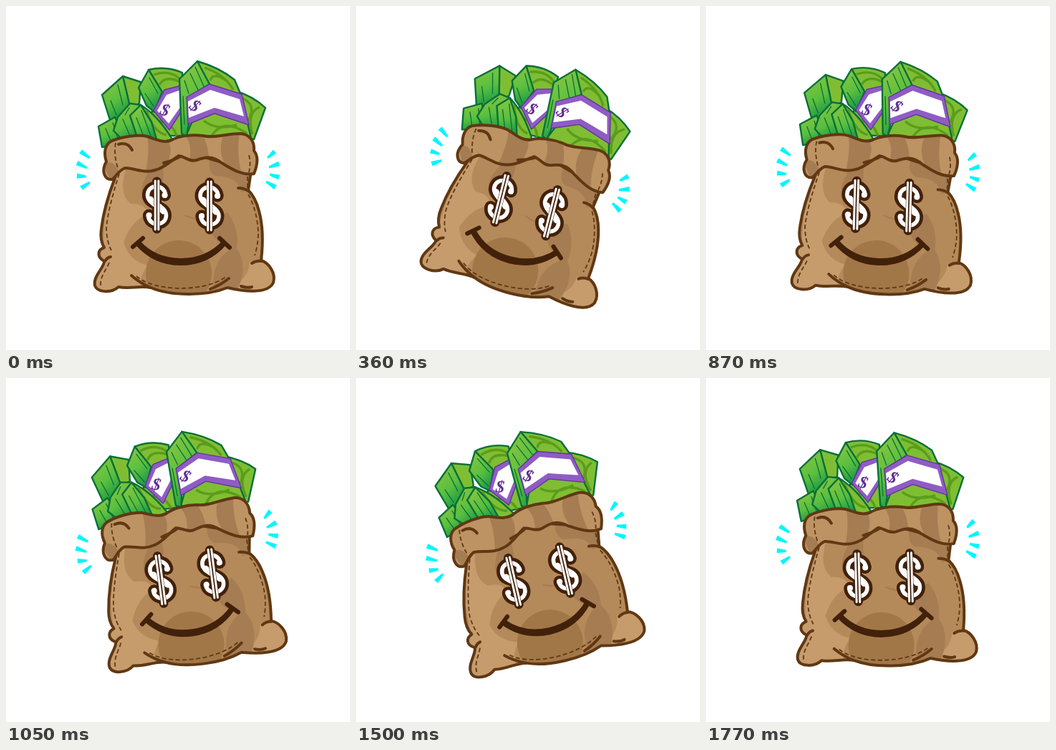
Recreate the animation shown at these times as an HTML page. Size 480 px wide and 480 px high, loop 1800 ms.

```html
<!DOCTYPE html>
<html lang="en">
<head>
<meta charset="utf-8">
<title>Happy money bag</title>
<style>
html, body { margin: 0; height: 100%; overflow: hidden; background: #fff; }
svg { display: block; width: 100vw; height: 100vh; }
.line { fill: none; stroke: #603813; stroke-width: 4; stroke-linecap: round; stroke-linejoin: round; }
.stitch { fill: none; stroke: #603813; stroke-width: 1.8; stroke-dasharray: 6 3.5; }
.bill { stroke: #08703a; stroke-width: 2.4; stroke-linejoin: round; }
.top { fill: #7fbe33; }
.side { fill: url(#side); }
.print { fill: none; stroke: #5b9c1b; stroke-width: 3.4; }
.edge { fill: none; stroke: #08703a; stroke-width: 1.3; stroke-linecap: round; }
.sign { fill: #5f2d91; font: italic bold 24px "Liberation Serif", serif; text-anchor: middle; }
.band { fill: #8f5cc4; stroke: #65349a; stroke-width: 1.4; stroke-linejoin: round; }
</style>
</head>
<body>
<svg viewBox="0 0 480 480">
<defs>
  <linearGradient id="side" x1=".2" y1="0" x2=".6" y2="1">
    <stop offset="0" stop-color="#8cc63f"/><stop offset=".55" stop-color="#5abf3f"/><stop offset="1" stop-color="#159447"/>
  </linearGradient>
  <path id="body" d="M160 215L152 240C145 258 136 286 133 311C131 325 134 332 137 337C128 340 126 350 137 356C138 364 121 377 124 390C127 400 147 401 157 392C173 395 187 390 202 393C230 405 280 405 309 393C330 398 365 403 373 386C377 372 366 358 356 355C359 329 358 304 353 286C349 270 343 262 338 257L342 230L240 200Z"/>
  <path id="collar" d="M146 189C161 182 185 179 197 182C209 186 218 191 229 188C241 181 260 179 275 181C290 185 308 178 327 178C341 179 347 190 346 202C353 210 350 224 346 234C328 237 313 226 301 219C288 208 278 211 266 215C256 218 250 210 241 209C231 215 221 226 208 229C192 234 179 226 166 226C156 230 154 238 148 242C138 243 132 231 140 217C136 205 138 194 146 189Z"/>
  <clipPath id="inBody"><use href="#body"/></clipPath>
  <clipPath id="inCollar"><use href="#collar"/></clipPath>
  <path id="ess" d="M12 -15C10 -30 -13 -30 -13 -14C-13 0 13 0 13 14C13 30 -11 30 -12 15"/>
  <g id="eye" fill="none" stroke-linecap="round">
    <g stroke="#42210b">
      <use href="#ess" stroke-width="15"/>
      <path d="M0 -33V33" stroke-width="13"/>
      <path d="M11 -14h.1M-11 14h.1" stroke-width="17"/>
    </g>
    <g stroke="#fff">
      <use href="#ess" stroke-width="5.6"/>
      <path d="M-9 -8C-5 -2 5 2 9 8" stroke-width="9"/>
      <path d="M11 -14h.1M-11 14h.1" stroke-width="8"/>
    </g>
    <path d="M0 -33V33" stroke="#42210b" stroke-width="8.5"/>
    <path d="M-2.3 -34V34M2.3 -34V34" stroke="#fff" stroke-width="2.9"/>
  </g>
</defs>

<g id="bag">
  <g id="rays" fill="#00f6ff"></g>

  <!-- bundles, back to front -->
  <g>
    <path class="bill top" d="M163 98L188 106L186 136L172 142Z"/>
    <path class="bill side" d="M134 124L163 98L172 136L172 160L146 162Z"/>
    <path class="edge" d="M146 132L154 152M156 110L163 138M163 98L170 126"/>

    <path class="bill top" d="M319 118Q345 126 362 142L346 186L333 184Z"/>
    <path class="print" d="M328 128Q351 137 338 160M354 141Q335 149 344 179"/>

    <path class="bill top" d="M199 89Q223 83 246 93L246 181H222L200 156L216 118Z"/>
    <path class="print" d="M206 96Q228 88 243 102M214 110Q222 96 243 106M211 160Q232 162 238 181"/>
    <path class="bill side" d="M185 114L199 89L218 120L207 148L196 139Z"/>
    <path class="edge" d="M194 122L206 140M200 100L212 122"/>
    <path class="band" d="M206 146L221 117L244 111L248 142L228 173Z"/>
    <path fill="#fff" d="M211 146L224 124L244 117L244 140L227 164Z"/>
    <text class="sign" transform="translate(222 145) rotate(18)" y="8">$</text>

    <path class="bill top" d="M267 77Q298 86 319 103L327 122L342 184H250L281 111Z"/>
    <path class="print" d="M277 86Q306 96 317 117M285 104Q289 91 309 105M276 160Q292 174 322 166M287 181Q304 155 336 178"/>
    <path class="bill side" d="M242 102L267 77L284 109L253 128L255 165L252 182L245 178Z"/>
    <path class="edge" d="M249 104L255 122M257 94L268 117M264 85L276 112M247 126L249 165"/>
    <path class="band" d="M252 127L284 109L329 123L339 166L291 150L254 165Z"/>
    <path fill="#fff" d="M254 133L285 117L326 130L332 154L291 142L255 156Z"/>
    <text class="sign" transform="translate(264 139) rotate(34)" y="8">$</text>

    <path class="bill side" d="M129 168L152 155L168 190L134 197Z"/>
    <path class="edge" d="M139 171L146 188M149 163L156 184"/>
    <path class="bill side" d="M156 155L173 136L188 138L186 192H168L150 174Z"/>
    <path class="bill top" d="M188 138Q212 153 232 186L208 192Z"/>
    <path class="print" d="M196 146Q206 177 224 180"/>
    <path class="bill side" d="M173 153L188 138L203 162L212 192H186Z"/>
    <path class="edge" d="M163 158L175 186M172 142L166 152M182 156L194 187M189 146L203 184"/>
  </g>

  <!-- sack -->
  <use href="#body" fill="#b48a5a"/>
  <g clip-path="url(#inBody)">
    <path fill="#c69c6d" d="M168 225Q156 262 174 276Q195 275 198 290Q174 300 164 330Q172 356 198 362Q182 382 190 400L120 404V335H136L138 296L152 240ZM309 396Q340 380 340 357L380 350V405H300Z"/>
    <path fill="#a67c52" d="M205 222Q180 257 194 278Q224 270 219 220ZM285 210Q280 230 292 237Q326 238 328 260L345 255V220ZM249 291Q279 306 309 288Q326 310 322 338Q340 365 320 402L290 402Q284 355 316 338Q296 337 283 311Q269 296 249 291Z"/>
    <circle cx="241" cy="373" r="46" fill="#a27748"/>
  </g>
  <use href="#body" class="line"/>
  <path class="line" d="M324 254Q332 254 338 258M138 356Q141 351 146 350M175 376Q186 386 202 393M285 395Q300 389 311 380M328 391Q337 394 343 392M343 359Q349 355 356 356"/>
  <path class="stitch" d="M158 234C151 256 141 290 140 312Q141 330 147 341M144 358C140 369 131 376 132 392M338 263C348 280 352 303 352 320Q351 336 347 348M182 377C207 399 278 400 308 377M337 238V253"/>
  <path d="M249 292Q264 299 281 297" fill="none" stroke="#a67c52" stroke-width="2"/>

  <use href="#collar" fill="#bd9363"/>
  <g clip-path="url(#inCollar)">
    <path fill="#a67c52" d="M196 176Q202 200 194 235L223 223Q235 202 225 184ZM244 175Q263 190 255 219L283 214Q283 194 273 178ZM306 175Q293 201 307 223L330 238Q321 210 326 175ZM135 220Q150 213 157 230L148 247Z"/>
  </g>
  <use href="#collar" class="line"/>
  <path class="line" d="M220 219Q235 215 243 210M157 193Q170 189 176 201"/>
  <path class="stitch" d="M153 191Q150 207 156 226M339 208Q342 219 339 232"/>

  <!-- face -->
  <use href="#eye" x="210.5" y="278"/>
  <use href="#eye" x="284" y="279"/>
  <path d="M186 328Q208 353 244 353Q280 353 303 328L307 332Q282 361 244 361Q206 361 181 332Z" fill="#42210b" stroke="#42210b" stroke-width="2"/>
  <path d="M177 336L191 324M298 324L312 337" fill="none" stroke="#42210b" stroke-width="6" stroke-linecap="round"/>
</g>
</svg>
<script>
const bag = document.getElementById("bag");

// Wedges: outer end x, y and inner tip x, y
const wedges = [
  [104, 203, 117, 212], [99, 219, 113, 226], [99, 237, 112, 238], [105, 254, 117, 246],
  [375, 203, 365, 212], [381, 220, 367, 225], [381, 239, 368, 235], [376, 253, 363, 245]
];
document.getElementById("rays").innerHTML = wedges.map(([x, y, u, v]) => {
  const len = Math.hypot(u - x, v - y);
  const nx = (y - v) / len, ny = (u - x) / len;
  const corner = (cx, cy, w) => `${cx + nx * w} ${cy + ny * w}`;
  return `<path d="M${corner(x, y, 3.4)}L${corner(u, v, 1.5)}L${corner(u, v, -1.5)}L${corner(x, y, -3.4)}Z"/>`;
}).join("");

const LOOP = 1800, STEP = 30, SWING = 15;
const start = performance.now();

function draw() {
  const ms = Math.max(0, performance.now() - start) % LOOP;
  const t = Math.floor(ms / STEP) * STEP;
  const angle = SWING * Math.sin(2 * Math.PI * t / LOOP);
  bag.setAttribute("transform", `rotate(${angle} 240 240)`);
  requestAnimationFrame(draw);
}
draw();
</script>
</body>
</html>
```
